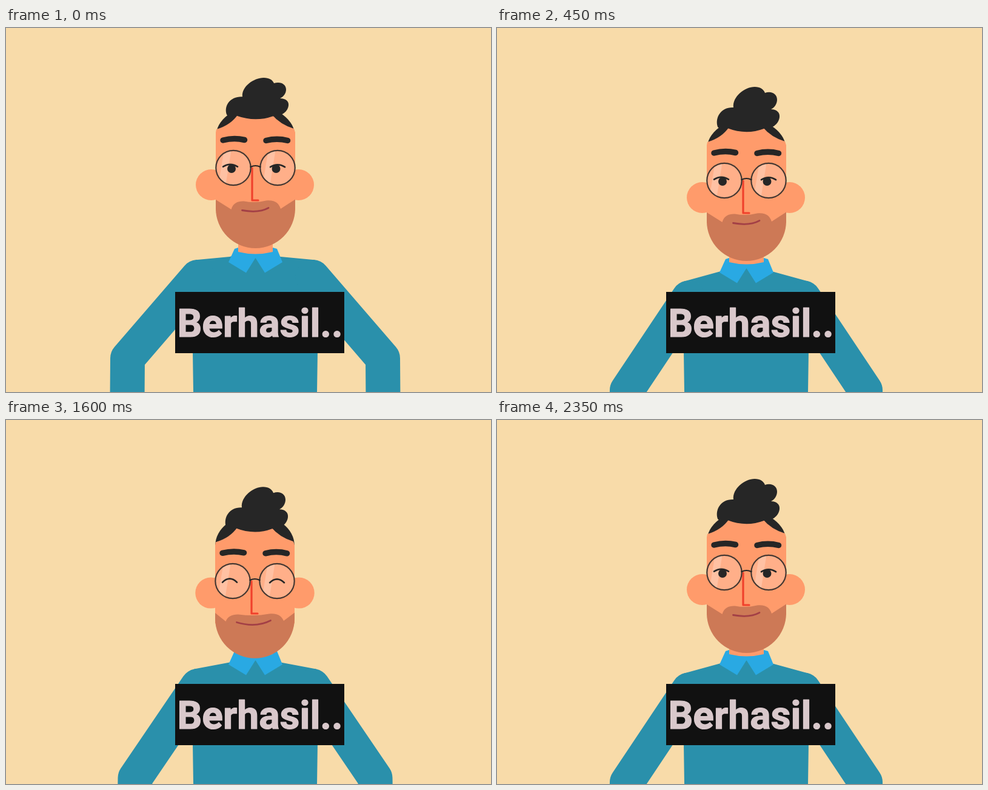
These frames come from a looping animation (800x600 px, 2550 ms). An HTML page with a canvas:

```html
<!DOCTYPE html>
<html lang="id">
<head>
<meta charset="utf-8">
<title>Berhasil</title>
<style>
  html, body { margin: 0; width: 100%; height: 100%; overflow: hidden; background: #f8dba9; }
  canvas { display: block; width: 800px; height: 600px; }
</style>
</head>
<body>
<canvas id="stage" width="800" height="600"></canvas>
<script>
const ctx = document.getElementById('stage').getContext('2d');
const LOOP = 2550, STEP = 50;
const MID = 411;      // mirror axis of the body
const ARM = 28.5;     // half the thickness of a sleeve
const C = {
  back: '#f8dba9', skin: '#ff9b6b', beard: '#cd7956', hair: '#262626',
  shirt: '#2a90ab', collar: '#29a9e3', nose: '#f0412c', mouth: '#a34046',
  frame: '#443832', sign: '#111111', text: '#d9c8cb'
};

// time, head, bun stretch, collar, shoulder, torso top, elbow x, elbow y, nod, smile
const FIELDS = ['time', 'head', 'bun', 'collar', 'shoulder', 'top', 'elbowX', 'elbowY', 'nod', 'smile'];
const POSES = [
  [0, -21, 0.92, -17, 410.5, 377, 200.5, 544.4, 0, 0],
  [150, 23, 1.108, 16, 455.5, 414, 213.5, 602, 0, 0],
  [450, 0, 1, 0, 445, 401, 214.5, 597, 0, 0],
  [1200, 0, 1, 0, 445, 401, 214.5, 597, 0, 0],
  [1400, 0, 1, 0, 436, 399, 212.5, 588, 19, 0.75],
  [1600, 0, 1, 0, 438.5, 399.5, 213, 590, 14, 1],
  [1850, 0, 1, 0, 439, 399.5, 213, 590.5, 13.4, 1],
  [2250, 0, 1, 0, 445, 401, 214.5, 597, 0, 0],
  [LOOP, 0, 1, 0, 445, 401, 214.5, 597, 0, 0]
];

function poseAt(t) {
  let i = 0;
  while (i < POSES.length - 2 && t >= POSES[i + 1][0]) i++;
  const a = POSES[i], b = POSES[i + 1];
  const k = (1 - Math.cos(Math.PI * (t - a[0]) / (b[0] - a[0]))) / 2;
  const pose = {};
  FIELDS.forEach((name, j) => { pose[name] = a[j] + (b[j] - a[j]) * k; });
  return pose;
}

function fill(path, color) {
  ctx.fillStyle = color;
  ctx.fill(typeof path === 'string' ? new Path2D(path) : path);
}

function line(path, color, width, cap = 'round') {
  ctx.strokeStyle = color;
  ctx.lineWidth = width;
  ctx.lineCap = cap;
  ctx.lineJoin = 'round';
  ctx.stroke(new Path2D(path));
}

function disc(x, y, r, color) {
  const p = new Path2D();
  p.arc(x, y, r, 0, 7);
  fill(p, color);
}

// Draws inside a shifted coordinate system.
function shifted(x, y, draw) {
  ctx.save();
  ctx.translate(x, y);
  draw();
  ctx.restore();
}

function body(p) {
  const sx = 316, sy = p.shoulder;
  const slope = Math.atan2(sy - ARM - p.top, 53);
  const tx = sx - ARM * Math.sin(slope), ty = sy - ARM * Math.cos(slope);
  const flip = x => 2 * MID - x;
  fill(`M307.5 500L${tx} ${ty}L369 ${p.top}L${MID} ${p.top - 12}L${flip(369)} ${p.top}` +
       `L${flip(tx)} ${ty}L514.5 500L513 600H309Z`, C.shirt);
  for (const side of [x => x, flip]) {
    line(`M${side(sx)} ${sy}L${side(p.elbowX)} ${p.elbowY}L${side(p.elbowX - 0.7)} 640`, C.shirt, ARM * 2);
  }
}

function neck() {
  fill('M377 381L367 403L396 420.5L411.5 396L427 420.5L456 403L447 381L440 379H383Z', C.collar);
  fill('M383 355V386Q411.5 393 440 386V355Z', C.skin);
}

// The crown follows a nod less than the hairline does.
function skull(nod) {
  const crown = new Path2D();
  crown.ellipse(411.5, 200 - nod * 0.5, 65.2, 50, 0, Math.PI, 2 * Math.PI);
  crown.lineTo(476.7, 200);
  crown.lineTo(346.3, 200);
  fill(crown, C.hair);
  fill('M346 322V193L347 188Q371 181 383 163H438Q452 180 475 187L477 193V322Z', C.skin);
}

function bun(stretch) {
  ctx.save();
  ctx.translate(0, 171);
  ctx.scale(1, stretch);
  ctx.translate(0, -171);
  fill('M364 163C359 147 370 130 390 131C388 113 409 97 425 97C434 97 440 101 442 107' +
       'C453 103 462 109 462 118C462 125 458 131 452 134C462 134 467 140 466 147' +
       'C465 157 455 167 440 166Q411 177 380 165Q367 168 364 163Z', C.hair);
  ctx.restore();
}

function beard(nod, smile) {
  const l = 371.5 - 8 * smile, r = 453 + 6 * smile, ly = 320 - 2 * smile;
  const chin = 318.5 - 0.38 * nod;
  const p = new Path2D(
    `M346 304L${l} ${ly}C${l + 3} 309 ${l + 12} 306 ${l + 21} 306.5` +
    `Q411 310 ${r - 24} 305.5C${r - 9} 304 ${r - 3} 310 ${r} ${ly - 1}L477 303.5V${chin}`);
  p.arc(411.5, chin, 65.5, 0, Math.PI);
  p.closePath();
  fill(p, C.beard);
  line(`M${389.5 - 8 * smile} ${321.5 - 2 * smile}Q${417 - 4 * smile} ${326.5 + 2.5 * smile} ` +
       `${433 + 4.5 * smile} ${317.5 - smile}`, C.mouth, 2.8);
}

function lens(x) {
  const ring = new Path2D();
  ring.arc(x, 251.5, 28.7, 0, 7);
  fill(ring, 'rgba(255,255,255,.2)');
  ctx.save();
  ctx.clip(ring);
  fill(`M${x - 15} 220H${x - 3}L${x - 13} 282H${x - 25}Z`, 'rgba(255,255,255,.22)');
  ctx.restore();
  ctx.strokeStyle = C.frame;
  ctx.lineWidth = 2.2;
  ctx.stroke(ring);
}

function eye(lidX, lidY, pupilX, shut) {
  const end = lidY + 4 * shut;
  if (shut < 1) {
    const p = new Path2D();
    p.ellipse(pupilX, 253, 7, 7 * (1 - shut), 0, 0, 7);
    fill(p, C.hair);
  }
  line(`M${lidX - 12} ${end}Q${lidX} ${lidY - 7.8} ${lidX + 12} ${end}`, C.hair, 2.6);
}

function face(p) {
  const shut = Math.min(1, Math.max(0, (p.smile - 0.2) / 0.4));
  line('M406 252V305H416', C.nose, 3.2);
  lens(375);
  lens(448);
  line('M403.5 250Q411.5 246 419.5 250', C.hair, 2.2);
  eye(370, 249.6, 372, shut);
  eye(448, 250.2, 445.5, shut);
}

function brows() {
  line('M358 206Q376 201.5 393.5 205.5', C.hair, 9.5);
  line('M429 206.5Q447 202 464.5 206.5', C.hair, 9.5);
}

function head(p, turned) {
  const dx = turned ? -1 : 0, spread = turned ? 0.7 : 0;
  const y = p.head, n = p.nod;
  disc(338.5 - spread, 279.5 + y + 0.4 * n, 25.5, C.skin);
  disc(482.5 + spread, 279.5 + y + 0.4 * n, 25.5, C.skin);
  shifted(dx, y + n * 0.95, () => skull(n));
  shifted(dx, y + n, () => {
    beard(n, p.smile);
    face(p);
  });
  shifted(dx, y + n * 0.95, () => {
    brows();
    bun(p.bun);
  });
}

function sign() {
  ctx.fillStyle = C.sign;
  ctx.fillRect(279, 435, 279, 101);
  ctx.font = 'bold 64px Roboto, sans-serif';
  ctx.fillStyle = ctx.strokeStyle = C.text;
  ctx.lineWidth = 1.2;
  ctx.fillText('Berhasil..', 282.5, 509);
  ctx.strokeText('Berhasil..', 282.5, 509);
}

function draw(now) {
  const t = Math.floor((now % LOOP) / STEP) * STEP;
  const p = poseAt(t);
  ctx.fillStyle = C.back;
  ctx.fillRect(0, 0, 800, 600);
  body(p);
  shifted(0, p.collar, neck);
  head(p, t >= 1200 && t < 2350);
  sign();
}

let start;
function tick() {
  const now = performance.now();
  if (start === undefined) start = now;
  draw(now - start);
  requestAnimationFrame(tick);
}
tick();
</script>
</body>
</html>
```
